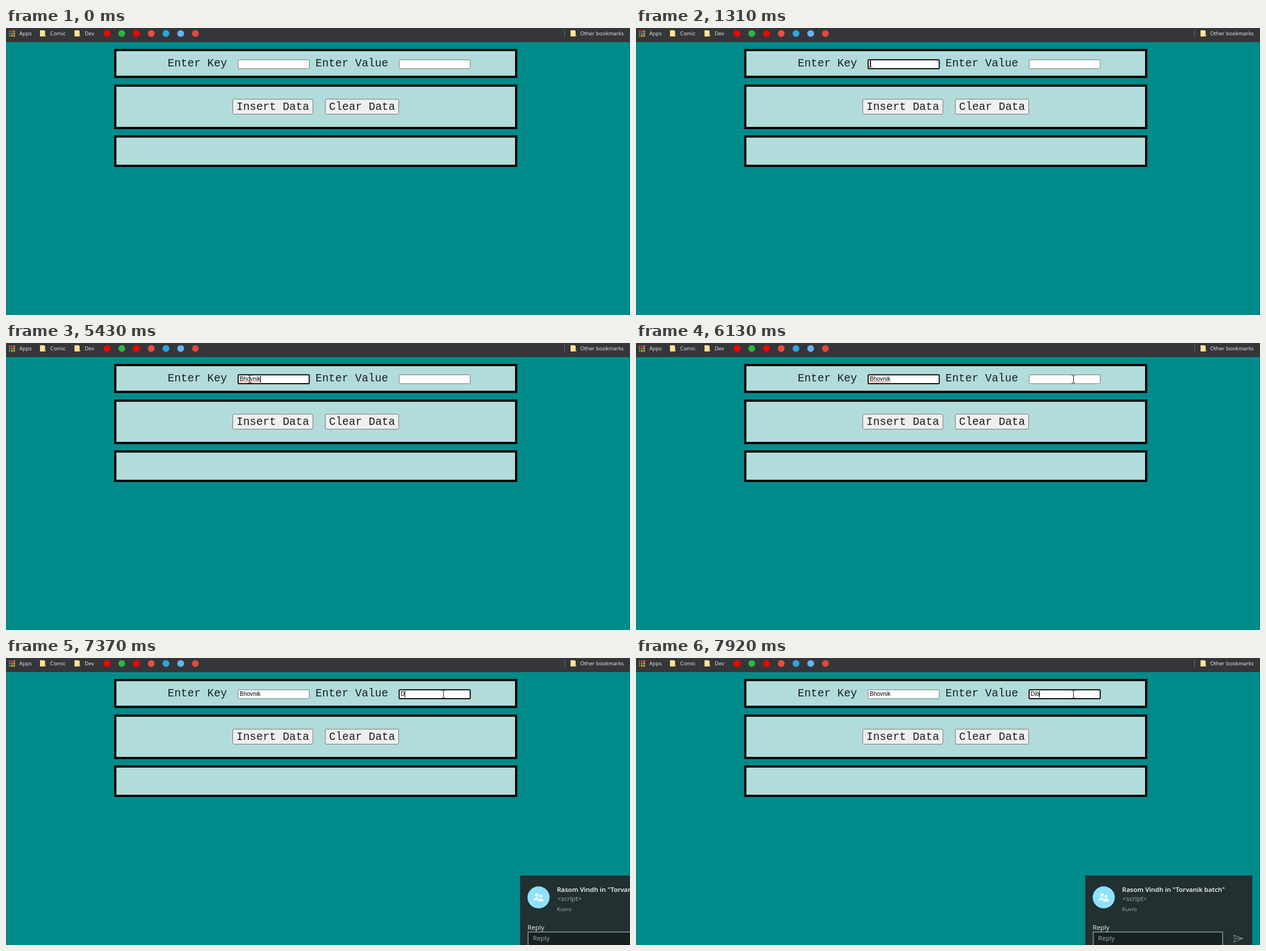
These frames come from a looping animation (1102x508 px, 8 s). An HTML page:

```html
<!DOCTYPE html>
<html lang="en">
<head>
<meta charset="utf-8">
<title>Key and value form</title>
<style>
  html, body { margin: 0; width: 100%; height: 100%; overflow: hidden; background: #008b8b; }
  svg { display: block; width: 100%; height: 100%; }
  text { white-space: pre; }
  .mono { font: 19.45px "Liberation Mono", "Courier New", monospace; fill: #1a1f22; }
  .typed { font: 10.3px "Liberation Sans", Arial, sans-serif; fill: #000; }
  .bar { font: 9.4px "Open Sans", sans-serif; fill: #eeeff1; }
  .toast { font: 11.6px "Open Sans", sans-serif; fill: #a5adad; }
  .toast .title { font-size: 11.5px; font-weight: 600; fill: #fff; }
  .toast .small { font-size: 9.6px; }
  .toast .label { fill: #f1f4f4; }
  .panel { fill: #b2dcdb; stroke: #000; stroke-width: 4; }
  .button { fill: #efefef; stroke: #767676; }
</style>
</head>
<body>
<svg viewBox="0 0 1102 508" preserveAspectRatio="none">
  <defs>
    <g id="folder">
      <path d="M0 0h7l1 1h1v10H0z" fill="#ffe394"/>
      <path d="M7 11V8h3v3z" fill="#e9b93f"/>
    </g>
  </defs>

  <rect width="1102" height="508" fill="#008b8b"/>
  <rect x="1101" y="25" width="1" height="483" fill="#04696a"/>
  <rect width="1102" height="25" fill="#35363a"/>
  <rect y="24" width="1102" height="1" fill="#2a3b3e"/>
  <g id="apps"></g>
  <use href="#folder" x="60" y="4"/>
  <use href="#folder" x="121" y="4"/>
  <use href="#folder" x="997" y="4"/>
  <g class="bar">
    <text x="23.5" y="13">Apps</text>
    <text x="78" y="13">Comic</text>
    <text x="139" y="13">Dev</text>
    <text x="1014" y="13">Other bookmarks</text>
  </g>
  <g id="sites"></g>
  <rect x="986" y="3" width="1" height="13" fill="#6a6b6e"/>

  <rect class="panel" x="193" y="39" width="708" height="47.5"/>
  <rect class="panel" x="193" y="102" width="708" height="75"/>
  <rect class="panel" x="193" y="192" width="708" height="52"/>
  <rect class="button" x="400.5" y="126" width="141.5" height="26.5" rx="2"/>
  <rect class="button" x="564" y="126" width="129.5" height="26.5" rx="2"/>
  <g class="mono">
    <text x="285.5" y="68">Enter Key</text>
    <text x="546.5" y="68">Enter Value</text>
    <text x="407" y="145">Insert Data</text>
    <text x="570.5" y="145">Clear Data</text>
  </g>

  <g id="fields"></g>
  <path id="squiggle" fill="none" stroke="#e8403a" stroke-width=".9"/>

  <g id="toast" class="toast">
    <rect y="385" width="295" height="123" fill="#223031"/>
    <circle cx="32.5" cy="423.7" r="19.5" fill="#8fe1fb"/>
    <g fill="#f2fbff">
      <circle cx="29.5" cy="419.5" r="3"/>
      <path d="M24 429q0-5 5.5-5 2 0 3 1-2 2-1.500 4z"/>
      <circle cx="36.500" cy="421.500" r="2.600"/>
      <path d="M31.500 431q0-5.500 5-5.500t5 5.500z"/>
    </g>
    <text class="title" x="65" y="413.500">Rasom Vindh in "Torvanik batch"</text>
    <text x="65.500" y="430">&lt;script&gt;</text>
    <text class="small" x="65" y="448">Kuvro</text>
    <text class="label" x="13" y="480.500">Reply</text>
    <rect x="14" y="485" width="228.500" height="30" fill="#172122" stroke="#7d8888" stroke-width="1.800"/>
    <text x="22.500" y="500">Reply</text>
    <path d="M261.500 490.500L278 496.500 261.500 503l3-6.500zM264.500 496.500H278" fill="none" stroke="#8d9797"/>
  </g>

  <circle id="click" r="10" fill="#ff0" fill-opacity=".47"/>
  <path id="beam" d="M-3-6.500h2l1 1 1-1h2M0-5.500v11M-3 6.500h2l1-1 1 1h2" fill="none" stroke="#222"/>
  <path id="arrow" d="M0 0v13.500l3-2.900 2.100 4.900 2.300-1-2.100-4.700h4.300z" fill="#fff" stroke="#000" stroke-width=".8"/>
</svg>

<script>
const LOOP = 8000;
const $ = id => document.getElementById(id);

function add(parent, tag, attrs) {
  const node = document.createElementNS("http://www.w3.org/2000/svg", tag);
  for (const key in attrs) node.setAttribute(key, attrs[key]);
  return parent.appendChild(node);
}
const show = (node, on) => node.setAttribute("visibility", on ? "visible" : "hidden");
const move = (node, x, y) => node.setAttribute("transform", `translate(${x} ${y})`);

const dots = ["#ea4335", "#ea4335", "#f28b5b", "#34a853", "#4c9bf5", "#fbbc04", "#34a853", "#fbbc04", "#fbbc04"];
dots.forEach((fill, i) => add($("apps"), "rect", {
  x: 5 + i % 3 * 4, y: 4.5 + Math.floor(i / 3) * 4, width: 2.8, height: 2.8, fill
}));

const sites = ["#f00", "#2bb741", "#f00", "#e8503e", "#2ca5e0", "#62b5ee", "#e2483d"];
sites.forEach((fill, i) => add($("sites"), "circle", { cx: 178.5 + i * 26, cy: 9.7, r: 6, fill }));

// One text field; keys are the times at which its letters arrive.
function makeField(x, word, keys, focusFrom, focusTo) {
  const parent = $("fields");
  return {
    x, word, keys, focusFrom, focusTo,
    box: add(parent, "rect", { y: 56.3, height: 15.6, width: 125.5, x: x + .5, rx: 1.5, fill: "#fff" }),
    text: add(parent, "text", { class: "typed", x: x + 3.3, y: 67.2 }),
    caret: add(parent, "rect", { y: 58, width: 1, height: 12 })
  };
}
const keyField = makeField(409.5, "Bhovnik", [2720, 2940, 3260, 3490, 3700, 4100, 4340], 1140, 6200);
const valueField = makeField(693.8, "Dib", [7220, 7690, 7840], 6200, LOOP);

function drawField(f, t) {
  const typed = f.keys.filter(k => k <= t);
  const focused = t >= f.focusFrom && t < f.focusTo;
  f.box.setAttribute("stroke", focused ? "#101010" : "#767676");
  f.box.setAttribute("stroke-width", focused ? 2 : 1);
  f.text.textContent = f.word.slice(0, typed.length);
  // The blink restarts at the click and at each key.
  const since = t - (typed.length ? typed[typed.length - 1] : f.focusFrom);
  show(f.caret, focused && Math.floor(since / 545) % 2 === 0);
  const width = typed.length ? f.text.getComputedTextLength() : 0;
  f.caret.setAttribute("x", Math.round(f.x + 3.3 + width - .3));
}

const ease = p => p * p * (3 - 2 * p);
function curve(a, b, c, p) {
  return a.map((v, i) => (1 - p) ** 2 * v + 2 * p * (1 - p) * b[i] + p * p * c[i]);
}
// Progress in held steps, as the screen was sampled.
function stepped(t, start, step, count) {
  return Math.min(1, Math.max(0, Math.floor((t - start) / step + 1e-6) / count));
}

function pointer(t) {
  if (t < 910) return curve([967, 492], [490, 310], [412, 64], ease(stepped(t, 130, 78, 10)));
  if (t < 990) return [412, 64];
  if (t < 5430) return [414.5, 62.5];
  return curve([414.5, 62.5], [650, 89], [773, 64.3], ease(stepped(t, 5353, 77, 9)));
}

function drawPointer(t) {
  const [x, y] = pointer(t);
  const inField = y > 56 && y < 72 && [409, 694].some(left => x > left && x < left + 126);
  show($("beam"), t >= 130 && inField);
  show($("arrow"), t >= 130 && !inField);
  move($("beam"), Math.round(x) - .5, y);
  move($("arrow"), x, y);
  show($("click"), t >= 1140 && t < 1310 || t >= 6200 && t < 6350);
  move($("click"), x - 2.3, y - 1.4);
}

let wave = "M413 69.500";
for (let i = 0; i < 18; i++) wave += `l2 ${i % 2 ? 1.5 : -1.5}`;
$("squiggle").setAttribute("d", wave);

const slides = [7370, 7460, 7540, 7600, 7680, 7760, 7840, 7920];
function drawToast(t) {
  const at = slides.filter(s => s <= t).pop();
  show($("toast"), at);
  if (at) move($("toast"), 793 + 115 * Math.exp(-(at - slides[0]) / 103), 0);
}

function draw(t) {
  drawField(keyField, t);
  drawField(valueField, t);
  show($("squiggle"), t >= 5430 && t < 6200);
  drawToast(t);
  drawPointer(t);
}

const begin = performance.now();
function tick() {
  draw((performance.now() - begin) % LOOP);
  requestAnimationFrame(tick);
}
tick();
</script>
</body>
</html>
```
